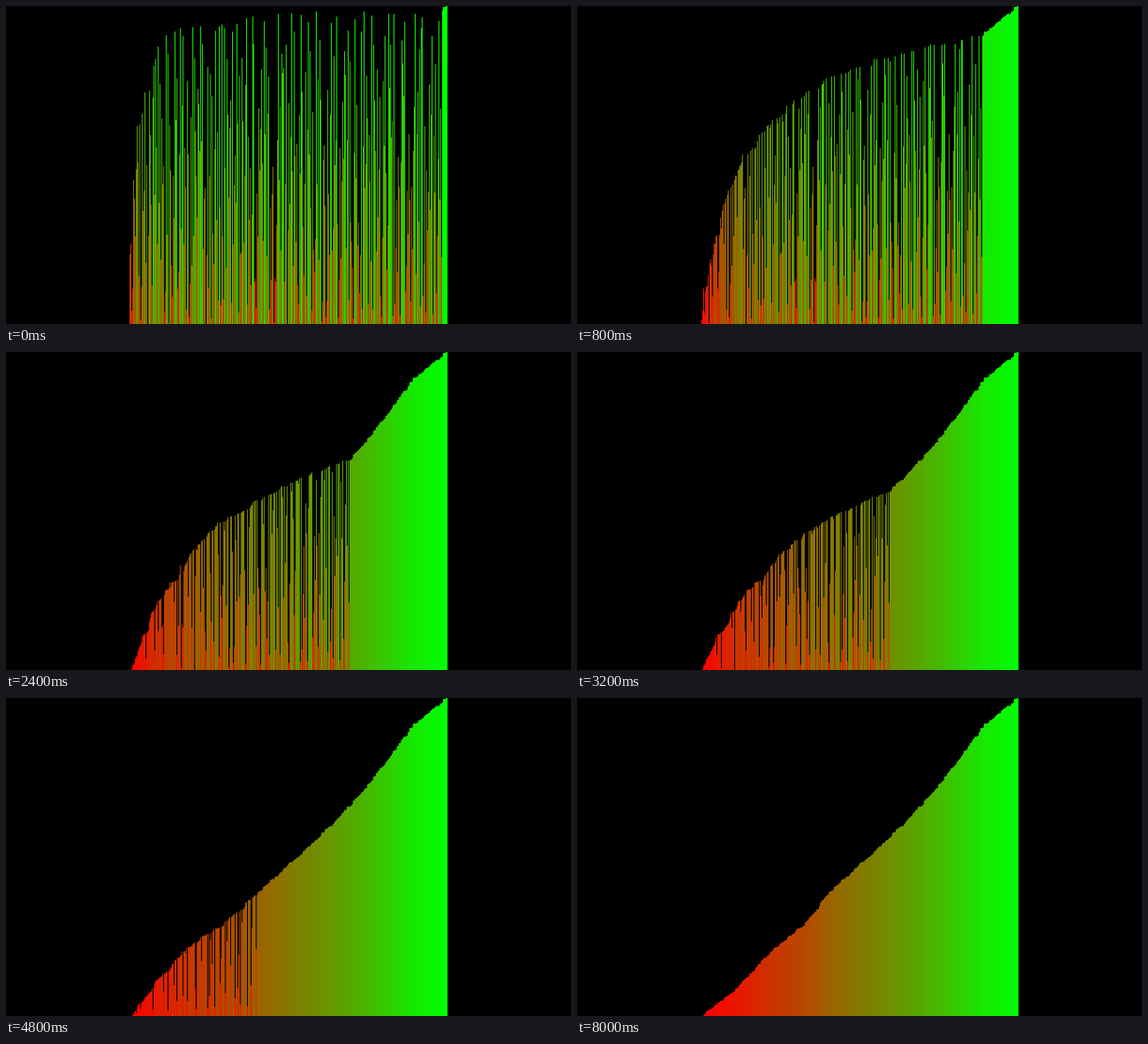
Animation, 600 px wide and 338 px high, one loop 9200 ms. Source, as a matplotlib script:

```python
import random

import matplotlib.pyplot as plt
import numpy as np
from matplotlib.animation import FuncAnimation

W, H = 600, 338
CANVAS_W, CANVAS_H = 640, 360   # bars are one pixel wide here, then scaled to the stage
COUNT = 360
LEFT = (CANVAS_W - COUNT) // 2
FRAMES, SORT_FRAMES = 92, 80
FIRST_PASSES, PASSES_PER_FRAME = 6, 4.37
BAND = 30


def sorted_heights(rng):
    """Nearly straight ramp through a few key points, roughened by jitter."""
    ranks = [0, 0.1, 0.235, 0.34, 0.4, 0.6, 0.74, 0.89, 1]
    levels = [0, 0.074, 0.215, 0.3, 0.385, 0.565, 0.71, 0.91, 1]
    jittered = [(i + rng.gauss(0, 1.5)) / (COUNT - 1) for i in range(COUNT)]
    return np.sort(np.round(CANVAS_H * np.interp(jittered, ranks, levels))).astype(int)


def mixed(heights, rng):
    """Shuffle so that each stretch of bars holds one from every height band."""
    bands = [rng.sample(heights[k:k + BAND], BAND) for k in range(0, COUNT, BAND)]
    return [bar for group in zip(*bands) for bar in rng.sample(group, len(group))]


def sort_states():
    """Bubble sort the mixed bars and keep the order reached in each frame."""
    rng = random.Random(5)
    final = sorted_heights(rng)
    bars = mixed(final.tolist(), rng)
    states, step = [], 0
    for frame in range(SORT_FRAMES):
        goal = round((FIRST_PASSES + PASSES_PER_FRAME * frame) * (COUNT - 1))
        while step < goal:
            i = step % (COUNT - 1)
            if bars[i] > bars[i + 1]:
                bars[i], bars[i + 1] = bars[i + 1], bars[i]
            step += 1
        states.append(np.array(bars))
    return states + [final]


def cubic_weights(size_in, size_out):
    """Matrix that resamples a line of pixels with a cubic kernel."""
    scale = size_in / size_out
    centers = (np.arange(size_out) + 0.5) * scale - 0.5
    d = np.abs(centers[:, None] - np.arange(size_in)) / scale
    near = 1.5 * d**3 - 2.5 * d**2 + 1
    far = -0.5 * d**3 + 2.5 * d**2 - 4 * d + 2
    weights = np.where(d < 1, near, np.where(d < 2, far, 0))
    return weights / weights.sum(axis=1, keepdims=True)


def render(heights):
    canvas = np.zeros((3, CANVAS_H, CANVAS_W))
    green = heights / CANVAS_H
    colors = np.stack([1 - green, green, 0 * green])
    filled = np.arange(CANVAS_H)[:, None] >= CANVAS_H - heights
    canvas[:, :, LEFT:LEFT + COUNT] = filled * colors[:, None, :]
    stage = scale_rows @ canvas @ scale_cols.T
    return np.moveaxis(np.clip(stage, 0, 1), 0, -1)


scale_rows = cubic_weights(CANVAS_H, H)
scale_cols = cubic_weights(CANVAS_W, W)
states = sort_states()

fig = plt.figure(figsize=(W / 100, H / 100), dpi=100, facecolor="black")
ax = fig.add_axes([0, 0, 1, 1])
ax.axis("off")
picture = ax.imshow(render(states[0]), interpolation="nearest", aspect="auto")


def update(frame):
    picture.set_data(render(states[min(frame, SORT_FRAMES)]))
    return [picture]


anim = FuncAnimation(fig, update, frames=FRAMES, interval=100, repeat=True,
                     repeat_delay=0, blit=False)
plt.show()
```
